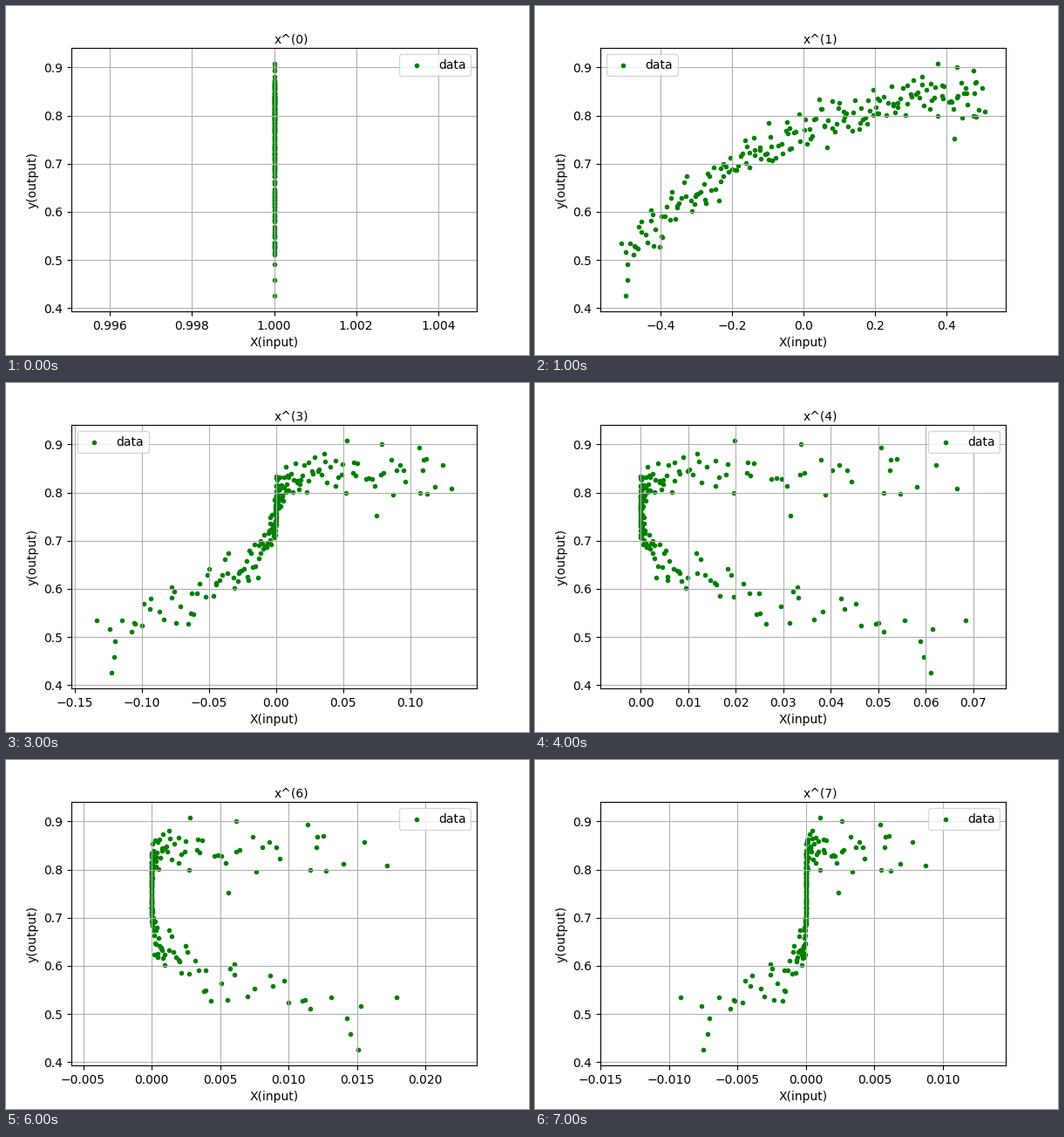
Animation, 600 px wide and 400 px high, one loop 8000 ms. Source, as a matplotlib script:

```python
import numpy as np
import matplotlib.pyplot as plt
from matplotlib.animation import FuncAnimation

POWERS = 8
LEGEND_LOC = {1: "upper left", 2: "lower left", 3: "upper left"}

# The samples that stand out from the cloud, as (x, y).
OUTLIERS = [
    (-0.5114, 0.535), (-0.498, 0.517), (-0.497, 0.426), (-0.494, 0.459),
    (0.375, 0.908), (0.4215, 0.752), (0.4745, 0.894), (0.482, 0.870),
    (0.4995, 0.857), (0.508, 0.808),
]


def make_samples(count=190, reach=0.49):
    """Noisy samples of a rising, flattening trend, plus the outliers."""
    rng = np.random.default_rng(4)
    x = np.linspace(-reach, reach, count) + rng.normal(0, 0.004, count)
    noise = np.clip(rng.normal(0, 0.024, count), -0.05, 0.055)
    y = 0.765 + 0.33 * x - 0.33 * x**2 + noise
    far_x, far_y = np.transpose(OUTLIERS)
    return np.append(x, far_x), np.append(y, far_y)


def limits(values, share=0.0515, pad=0.00494):
    low, high = values.min(), values.max()
    margin = share * (high - low) + pad
    return low - margin, high + margin


x, y = make_samples()

fig, ax = plt.subplots(figsize=(6, 4), dpi=100)
fig.subplots_adjust(left=0.125, right=0.9, bottom=0.125, top=0.88)


def draw(power):
    ax.clear()
    xs = x**power
    ax.scatter(xs, y, marker=".", c="g", label="data")
    ax.set_xlim(limits(xs))
    ax.set_ylim(0.3935, 0.9405)
    ax.set_xlabel("X(input)")
    ax.set_ylabel("y(output)")
    ax.text(0.5, 1.0067, f"x^({power})", transform=ax.transAxes, va="bottom")
    ax.grid(True)
    ax.legend(loc=LEGEND_LOC.get(power, "upper right"))


anim = FuncAnimation(fig, draw, frames=POWERS, init_func=lambda: draw(0),
                     interval=1000, repeat=True, repeat_delay=0)
plt.show()
```
